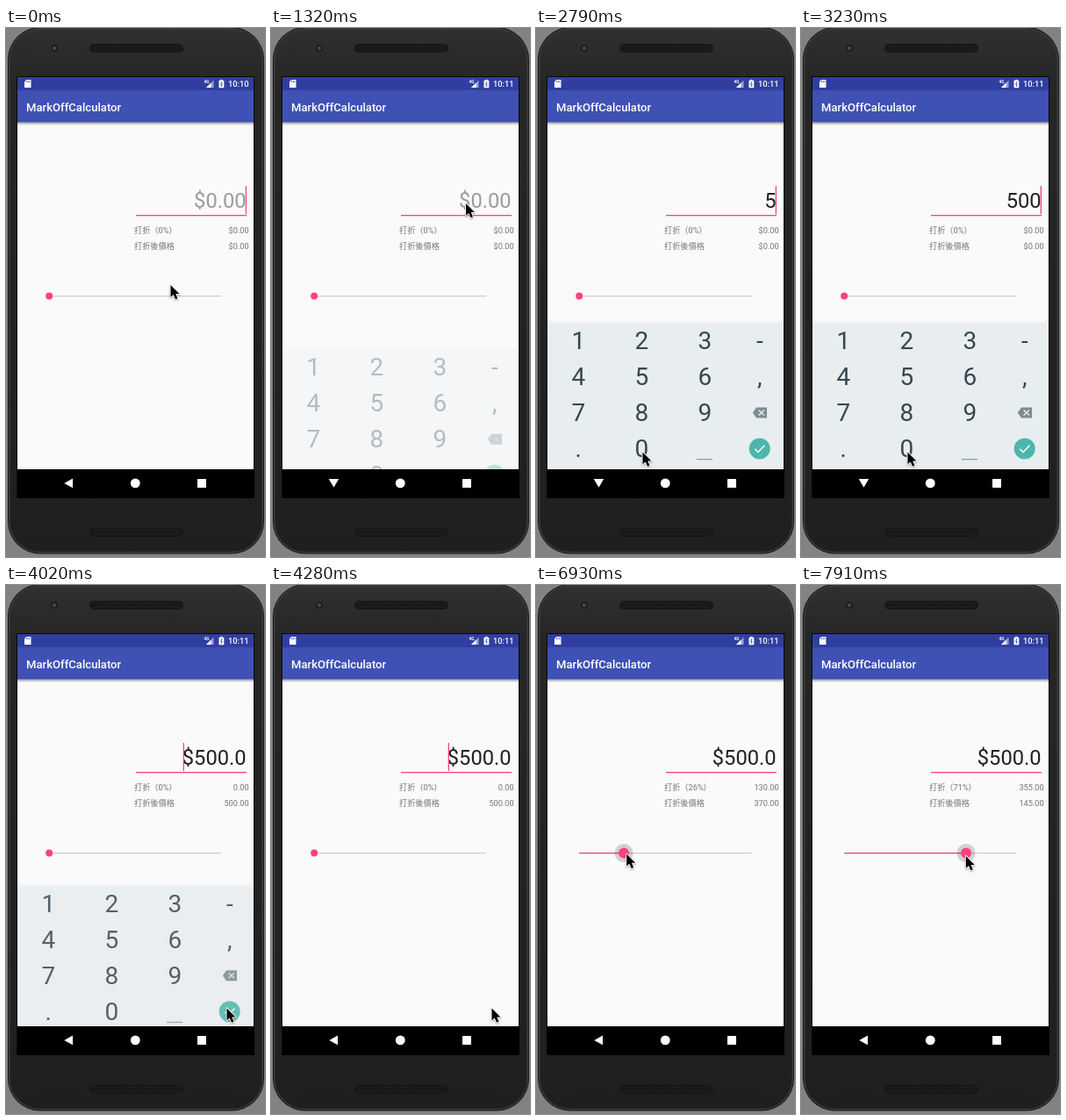
An HTML page with a canvas for the animation above (8000 ms loop, 295x603 px).

```html
<!DOCTYPE html>
<html lang="zh-Hant">
<head>
<meta charset="utf-8">
<title>Discount slider</title>
<style>
html, body { margin: 0; width: 100%; height: 100%; overflow: hidden; background: #828282; }
canvas { display: block; width: 295px; height: 603px; }
</style>
</head>
<body>
<canvas id="stage"></canvas>
<script>
const W = 295, H = 603, LOOP = 8000, TICK = LOOP / 91;
const LEFT = 13, WIDTH = 269;
const FONT = 'Roboto, "Noto Sans CJK TC", "Noto Sans CJK JP", "Noto Sans CJK", sans-serif';
const PINK = '#ff4081', PAPER = '#fafafa', KEYS = '#e8edef';
const FOCUS = 620, DONE = 4000, DRAG = 5890, DRAG_END = 7911;
const canvas = document.getElementById('stage');
const ctx = canvas.getContext('2d');
const ratio = window.devicePixelRatio || 1;
canvas.width = W * ratio;
canvas.height = H * ratio;

// What the amount field holds from each moment on
const EDITS = [
  { at: 2440, value: '5' },
  { at: 2940, value: '50' },
  { at: 3210, value: '500' },
  { at: DONE, value: '$500.0' }
];

const HOME = [187.5, 293];
// Each pointer move ends at (x, y)
const MOVES = [
  { from: 540, to: 880, x: 222, y: 200 },
  { from: 1690, to: 2060, x: 134, y: 388 },
  { from: 2480, to: 2800, x: 121.5, y: 483.5 },
  { from: 3350, to: 3850, x: 251.5, y: 482.5 },
  { from: 4480, to: 4830, x: 129, y: 383 },
  { from: 4930, to: 5600, x: 48, y: 306 },
  { from: 5800, to: 5880, x: 54.5, y: 305.5 },
  { from: DRAG, to: DRAG_END, x: 187.8, y: 309, power: 1.55 }
];

const ramp = (t, a, b) => Math.max(0, Math.min(1, (t - a) / (b - a)));
const within = (t, a, b) => t >= a && t < b;
const snap = t => Math.floor((t + 30) / TICK) * TICK;

function pointerAt(t) {
  let [x, y] = HOME;
  for (const m of MOVES) {
    const k = ramp(t, m.from, m.to) ** (m.power || 1);
    x += (m.x - x) * k;
    y += (m.y - y) * k;
  }
  return [x, y];
}

// The caret blinks every half second, restarting on focus and on each edit
function caretVisible(t) {
  const resets = [-150, FOCUS, ...EDITS.map(e => e.at)];
  const last = Math.max(...resets.filter(r => r <= t));
  return Math.floor((t - last) / 500) % 2 === 0;
}

function rect(x, y, w, h, color) {
  ctx.fillStyle = color;
  ctx.fillRect(x, y, w, h);
}

function round(x, y, w, h, r, color) {
  ctx.beginPath();
  ctx.roundRect(x, y, w, h, r);
  ctx.fillStyle = color;
  ctx.fill();
}

function disc(x, y, r, color) {
  ctx.beginPath();
  ctx.arc(x, y, r, 0, Math.PI * 2);
  ctx.fillStyle = color;
  ctx.fill();
}

function trace(points, close = true) {
  ctx.beginPath();
  points.forEach(([x, y]) => ctx.lineTo(x, y));
  if (close) ctx.closePath();
}

function poly(points, color) {
  trace(points);
  ctx.fillStyle = color;
  ctx.fill();
}

function line(points, color, width) {
  trace(points, false);
  ctx.strokeStyle = color;
  ctx.lineWidth = width;
  ctx.stroke();
}

function text(s, x, y, size, color, align = 'left', weight = 400) {
  ctx.font = `${weight} ${size}px ${FONT}`;
  ctx.textAlign = align;
  ctx.fillStyle = color;
  ctx.fillText(s, x, y);
}

function fade(y, h, from, to) {
  const g = ctx.createLinearGradient(0, y, 0, y + h);
  g.addColorStop(0, from);
  g.addColorStop(1, to);
  rect(LEFT, y, WIDTH, h, g);
}

function speaker(y) {
  round(95, y, 107, 10, 5, '#171717');
  for (let r = 0; r < 3; r++)
    for (let x = 99 + r % 2; x < 199; x += 2) rect(x, y + 2 + r * 2.5, 1, 1, '#272727');
}

function phone() {
  rect(0, 0, W, H, '#828282');
  round(2, -1, 292, 600.5, 37, '#191919');
  round(3, 0, 290, 598.5, 36, '#3c3c3c');
  const g = ctx.createLinearGradient(0, 0, 0, H);
  g.addColorStop(0, '#303030');
  g.addColorStop(0.1, '#262626');
  g.addColorStop(1, '#1f1f1f');
  round(4.5, 1.5, 287, 595.5, 34, g);
  speaker(18);
  speaker(570);
  disc(55, 23, 4, '#1c1c1c');
  disc(55, 23, 2.2, '#45484a');
  rect(12, 55, 271, 481, '#080808');
  rect(LEFT, 56, WIDTH, 480, PAPER);
}

function statusBar(t) {
  const blue = '#303f9f';
  rect(LEFT, 56, WIDTH, 15, blue);
  poly([[23.2, 59], [28.5, 59], [28.5, 68], [21, 68], [21, 61.3]], '#fff');
  for (let i = 0; i < 3; i++) rect(23.2 + i * 1.6, 60.2, 0.8, 1.8, blue);
  text('4G', 225.5, 63, 4.6, '#fff', 'left', 700);
  poly([[236.5, 59.5], [236.5, 68], [228, 68]], '#9aa2d1');
  poly([[233.5, 62.5], [233.5, 68], [228, 68]], '#fff');
  round(242.5, 59.8, 5.8, 8.4, 0.6, '#fff');
  rect(244.2, 58.8, 2.4, 1.5, '#fff');
  line([[246, 61], [244.6, 64.2], [246.2, 64.2], [245, 67]], blue, 0.9);
  text(t < 950 ? '10:10' : '10:11', 276.6, 67, 9.3, '#fff', 'right', 500);
}

function appBar() {
  rect(LEFT, 71, WIDTH, 36.5, '#3f51b5');
  fade(107.5, 3.5, 'rgba(0,0,0,.36)', 'rgba(0,0,0,0)');
  text('MarkOffCalculator', 23, 94.7, 13.1, '#fff', 'left', 500);
}

function form(t, percent) {
  const edit = EDITS.filter(e => e.at <= t).pop();
  const done = t >= DONE;
  text(edit ? edit.value : '$0.00', 273.6, 205.3, 23.7, edit ? '#212121' : '#9c9c9c', 'right');
  rect(148, 213, 126, 1.3, PINK);
  if (caretVisible(t)) rect(done ? 201.7 : 272.7, 180, 1.3, 32, PINK);

  const cut = percent * 5;
  const row = (label, value, y) => {
    text(label, 146, y, 9.2, '#757575');
    text(done ? value.toFixed(2) : '$0.00', 276.7, y, 9.2, '#757575', 'right');
  };
  row(`打折（${percent}%）`, cut, 234.2);
  row('打折後價格', 500 - cut, 252.2);
}

function seekBar(t, percent) {
  const start = 49.2, x = start + percent * 1.955, y = 305.5;
  const press = ramp(t, DRAG, DRAG + 190);
  rect(start, 305, 196, 1.2, '#cbcbcb');
  rect(start, 305, x - start, 1.2, '#dc4a74');
  if (press) disc(x, y, 4 + 6.5 * press, 'rgba(0,0,0,.16)');
  disc(x, y, 4 + 2 * press, PINK);
}

function keyboard(t) {
  const shown = ramp(t, 1240, 1480) * (1 - ramp(t, DONE, 4290));
  if (!shown) return;
  ctx.save();
  ctx.beginPath();
  ctx.rect(LEFT, 108, WIDTH, 395);
  ctx.clip();
  ctx.globalAlpha = shown;
  ctx.translate(0, (1 - shown) * 45);
  fade(333, 4, 'rgba(232,237,239,0)', KEYS);
  rect(LEFT, 337, WIDTH, 167, KEYS);

  for (const { at, value } of EDITS)
    if (at < DONE && within(t, at - 90, at))
      round(87, value === '5' ? 381 : 462, 67, 33, 2, 'rgba(55,71,79,.1)');

  ['123-', '456,', '789', '.0'].forEach((keys, r) =>
    [...keys].forEach((key, c) =>
      text(key, Math.min(48.3 + c * 72, 254.8), 366 + r * 41, 28, '#37474f', 'center')));
  rect(183, 491, 18, 1.3, '#90a0a7');

  poly([[251, 432.4], [263, 432.4], [263, 444.4], [251, 444.4], [246.8, 438.4]], '#7d8b92');
  for (const s of [-1, 1])
    line([[253.7, 438.4 - 3 * s], [260, 438.4 + 3 * s]], KEYS, 1.4);

  disc(254.7, 479.5, 12, within(t, 3840, DONE) ? '#3e9d94' : '#4db6ac');
  line([[249.3, 479.8], [253, 483.5], [260.4, 475.8]], '#fff', 1.5);
  ctx.restore();
}

function navBar(t) {
  rect(LEFT, 503, 270, 33, '#000');
  const down = within(t, 1310, DONE);
  poly(down ? [[65.8, 514], [77.2, 514], [71.5, 523.8]]
            : [[76, 513.5], [76, 524.3], [66.3, 518.9]], '#fff');
  disc(147.3, 518.9, 5.4, '#fff');
  round(218, 514, 10, 10, 0.6, '#fff');
}

function pointer([x, y]) {
  ctx.save();
  ctx.translate(x, y);
  ctx.shadowColor = 'rgba(0,0,0,.35)';
  ctx.shadowBlur = 2 * ratio;
  ctx.shadowOffsetY = ratio;
  trace([[0, 0], [0, 13.8], [3.2, 10.9], [5.5, 16.3], [8, 15.2], [5.8, 10], [10, 10]]);
  ctx.lineJoin = 'round';
  ctx.lineWidth = 1.8;
  ctx.strokeStyle = '#fff';
  ctx.stroke();
  ctx.shadowColor = 'transparent';
  ctx.fillStyle = '#000';
  ctx.fill();
  ctx.restore();
}

function draw(now) {
  const t = snap(now % LOOP);
  const percent = Math.round(71 * ramp(t, DRAG, DRAG_END) ** 1.55);
  ctx.setTransform(ratio, 0, 0, ratio, 0, 0);
  phone();
  appBar();
  statusBar(t);
  form(t, percent);
  seekBar(t, percent);
  keyboard(t);
  navBar(t);
  pointer(pointerAt(t));
}

const start = performance.now();
function loop() {
  draw(performance.now() - start);
  requestAnimationFrame(loop);
}
loop();
</script>
</body>
</html>
```
